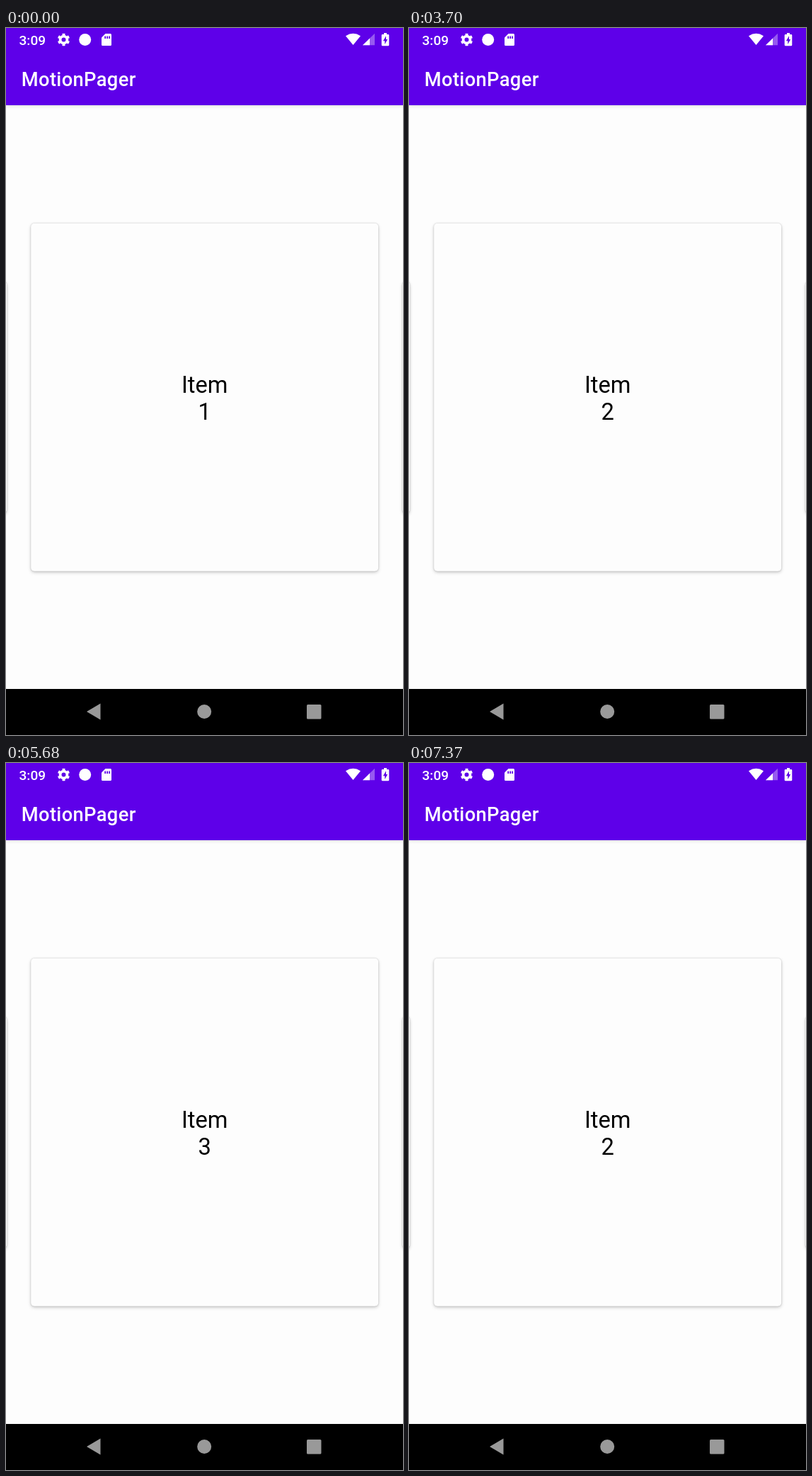
An HTML page for the animation above (8.21 s loop, 561 by 998 pixels).

```html
<!DOCTYPE html>
<html lang="en">
<head>
<meta charset="utf-8">
<title>MotionPager</title>
<style>
  html, body { margin: 0; width: 100%; height: 100%; overflow: hidden; background: #fdfdfd; }
  svg { display: block; width: 100%; height: 100%; font-family: Roboto, sans-serif; }
  .card rect {
    fill: #fdfdfd;
    filter: drop-shadow(0 0 .8px rgba(0, 0, 0, .2)) drop-shadow(0 2px 2px rgba(0, 0, 0, .19));
  }
  .card text { font-size: 32.7px; text-anchor: middle; fill: #000; }
  .bar { fill: #5e00e9; filter: drop-shadow(0 1px 2px rgba(0, 0, 0, .14)); }
  .light { fill: #fff; }
  .hole { fill: #5e00e9; }
  .clock { font-size: 19.1px; font-weight: 500; }
  .title { font-size: 27.3px; font-weight: 500; letter-spacing: .0125em; }
  .nav { fill: #999; }
</style>
</head>
<body>
<svg viewBox="0 0 561 998" id="stage">
  <g id="pager"></g>

  <rect class="bar" width="561" height="109"/>
  <g class="light">
    <text class="clock" x="18.5" y="23.8">3:09</text>
    <text class="title" x="21.8" y="81.5">MotionPager</text>

    <!-- settings -->
    <g fill="none" stroke="#fff">
      <circle cx="81.5" cy="16.5" r="4.9" stroke-width="3.8"/>
      <circle cx="81.5" cy="16.5" r="7.3" stroke-width="2.8" pathLength="12"
              stroke-dasharray="1 1" stroke-dashoffset="-.5"/>
    </g>

    <circle cx="111.7" cy="16.5" r="8.5"/>

    <!-- memory card -->
    <path d="M140.5 8H147.5Q149 8 149 9.5V23.5Q149 25 147.5 25H136.5Q135 25 135 23.5V13.5Z"/>
    <path class="hole" d="M139.3 11.5h1.8v3.6h-1.8zM142.3 11.5h1.8v3.6h-1.8zM145.3 11.5h1.8v3.6h-1.8z"/>

    <!-- wifi, signal, battery -->
    <path d="M490.5 24L480 11.2Q490.5 4.4 501 11.2Z"/>
    <path d="M504 24.3L521 7.7V24.3Z" opacity=".35"/>
    <path d="M504 24.3L514 14.5V24.3Z"/>
    <path d="M534 7h4v2h2q1.3 0 1.3 1.3V24q0 1.3-1.3 1.3h-8q-1.3 0-1.3-1.3V10.3q0-1.3 1.3-1.3h2z"/>
    <path class="hole" d="M537 11.2L532.9 18.3H535.3V23L539.2 15.9H537Z"/>
  </g>

  <rect y="933" width="561" height="65"/>
  <g class="nav">
    <path d="M114 965L133.5 953.5V976.5Z"/>
    <circle cx="280.2" cy="965" r="10"/>
    <rect x="425" y="955" width="20.5" height="20.5" rx="1.5"/>
  </g>
</svg>

<script>
const LOOP = 8210;
const CENTER_X = 280.7, CENTER_Y = 521.2;
const FULL = 491, SMALL = 327, SPACING = 443;
const DRAG = 400, SETTLE = 390;

// released: share of the page covered when the finger lets go
const swipes = [
  { start: 2550, step: 1, released: .627 },
  { start: 4490, step: 1, released: .627 },
  { start: 6350, step: -1, released: .656 },
];

function swipeProgress(t, released) {
  if (t <= 0) return 0;
  if (t < DRAG) return released * (t / DRAG) ** 2.4;
  const rest = Math.max(0, 1 - (t - DRAG) / SETTLE);
  return 1 - (1 - released) * rest ** 4;
}

function pageAt(time) {
  return swipes.reduce(
    (page, s) => page + s.step * swipeProgress(time - s.start, s.released), 1);
}

function svg(tag, attrs, parent, content = '') {
  const node = document.createElementNS('http://www.w3.org/2000/svg', tag);
  setAttrs(node, attrs);
  node.textContent = content;
  return parent.appendChild(node);
}

function setAttrs(node, attrs) {
  for (const [name, value] of Object.entries(attrs)) node.setAttribute(name, value);
}

const pager = document.getElementById('pager');
const cards = [0, 1, 2, 3, 4].map(index => {
  const group = svg('g', { class: 'card' }, pager);
  const rect = svg('rect', { rx: 5 }, group);
  svg('text', { y: 514.8 }, group, 'Item');
  svg('text', { y: 553 }, group, index);
  return { index, group, rect };
});

function draw(time) {
  const page = pageAt(time);
  for (const { index, group, rect } of cards) {
    const offset = index - page;
    const size = FULL - (FULL - SMALL) * Math.min(1, Math.abs(offset));
    setAttrs(group, { transform: `translate(${CENTER_X + SPACING * offset} 0)` });
    setAttrs(rect, { x: -size / 2, y: CENTER_Y - size / 2, width: size, height: size });
  }
}

const begin = performance.now();
function frame() {
  draw((performance.now() - begin) % LOOP);
  requestAnimationFrame(frame);
}
frame();
</script>
</body>
</html>
```
